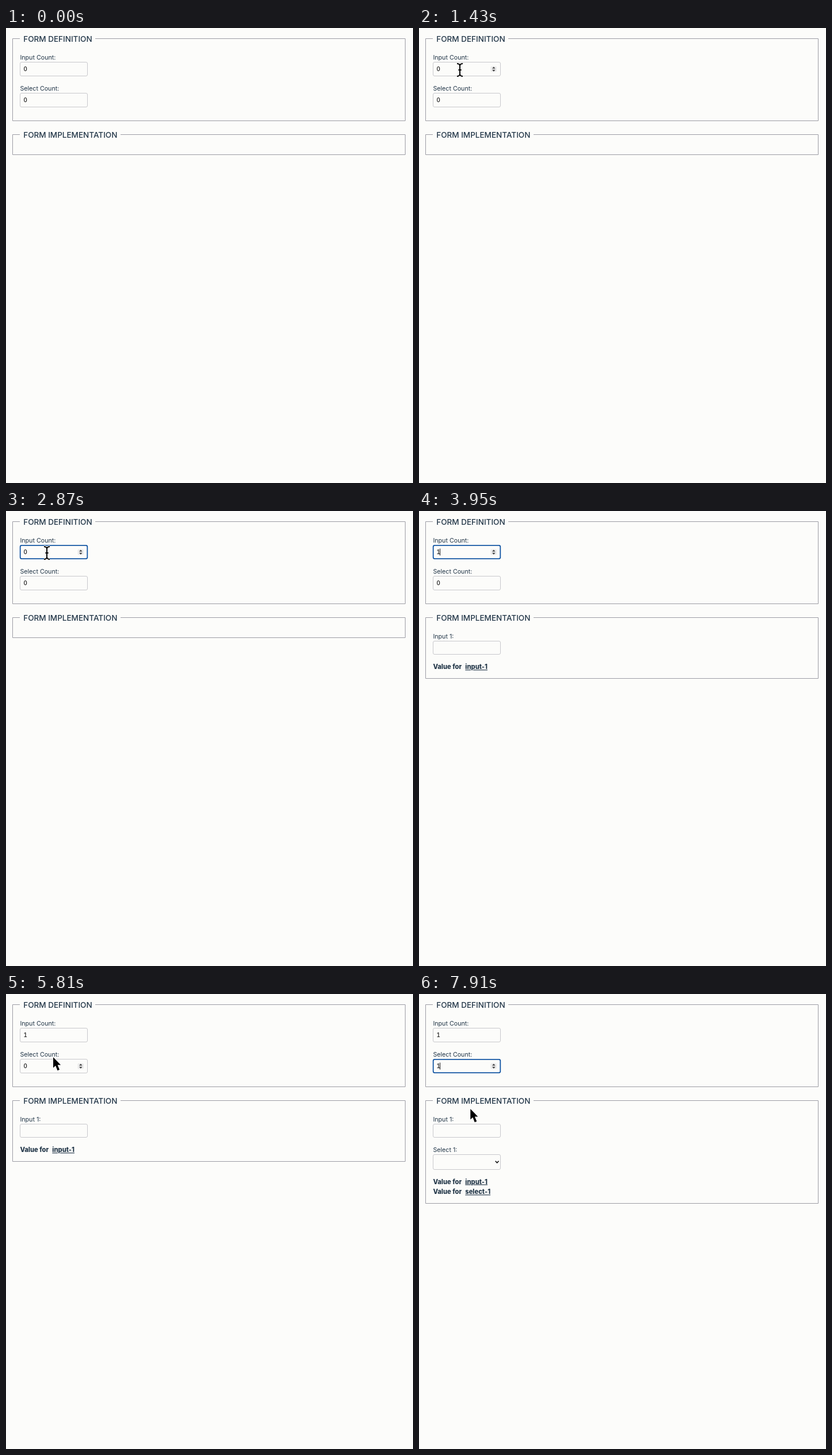
An HTML page for the animation above (8 s loop, 707 by 792 pixels).

```html
<!DOCTYPE html>
<html lang="en">
<head>
<meta charset="utf-8">
<title>Dynamic form</title>
<style>
  html, body { margin: 0; width: 100%; height: 100%; overflow: hidden; background: #fcfcfa; }
  svg { display: block; width: 100%; height: 100%; }
  text { font-family: Inter, sans-serif; fill: #213547; white-space: pre; }
  .legend { font-size: 13.5px; font-weight: 450; }
  .label { font-size: 10.7px; }
  .value { font-size: 9.8px; font-weight: 500; font-variant-numeric: tabular-nums; fill: #111; }
  .bold { font-size: 11.15px; font-weight: 800; }
  .under { text-decoration: underline; }
  .frame { fill: none; stroke: #9c9ca4; }
  .box { fill: none; stroke: #c8c8cc; }
  .ring { fill: none; stroke: #1457a4; stroke-width: 1.8; }
</style>
</head>
<body>
<svg id="stage" viewBox="0 0 707 792" preserveAspectRatio="none"></svg>
<script>
const LOOP = 8000;
const FIRST_FOCUS = 1570, FIRST_TYPE = 3680, BLUR = 5800;
const SECOND_FOCUS = 5910, SECOND_TYPE = 6880;

// Each run of [ms, x, y] is one stretch in which the pointer is visible.
const runs = [
  [[20, 190, 445], [420, 135, 250], [770, 92, 100], [960, 84, 84], [1140, 74, 62],
   [1340, 71, 73], [FIRST_TYPE, 71, 73]],
  [[4350, 71, 73], [4560, 71, 73], [4790, 74, 85], [4900, 74, 85], [5450, 82, 110],
   [SECOND_TYPE, 82, 110]],
  [[7590, 82, 110], [7850, 89.3, 200], [LOOP, 89.3, 200]]
];

const stage = document.getElementById("stage");

function add(parent, tag, attrs, content) {
  const el = document.createElementNS("http://www.w3.org/2000/svg", tag);
  for (const name in attrs) el.setAttribute(name, attrs[name]);
  if (content) el.textContent = content;
  return parent.appendChild(el);
}
const group = parent => add(parent, "g", {});
const text = (parent, cls, x, y, content) => add(parent, "text", { class: cls, x, y }, content);
const show = (el, on) => el.setAttribute("visibility", on ? "visible" : "hidden");

function fieldset(y, gapEnd, title) {
  const frame = add(stage, "path", { class: "frame" });
  text(stage, "legend", 30.2, y + 5.2, title);
  return bottom => frame.setAttribute("d",
    `M24 ${y}H11.5V${bottom}H693.5V${y}H${gapEnd}`);
}

function control(parent, label, y, height = 24) {
  text(parent, "label", 24.4, y - 4.5, label);
  add(parent, "rect", { class: "box", x: 24.5, y, width: 117, height, rx: 2.5 });
}

function numberField(label, y) {
  control(stage, label, y);
  const value = text(stage, "value", 30.6, y + 15.7, "0");
  const spinner = group(stage);
  add(spinner, "rect", { x: 124.5, y: y + 7, width: 10.5, height: 10, rx: 2, fill: "#ececec" });
  add(spinner, "path", {
    fill: "#3c3c3c",
    d: `M127 ${y + 11}l2.8-3 2.8 3zM127 ${y + 13.2}l2.8 3 2.8-3z`
  });
  const ring = add(stage, "rect", {
    class: "ring", x: 24.7, y: y + .4, width: 116.6, height: 23.2, rx: 2.5
  });
  const caret = add(stage, "rect", { x: 36, y: y + 6, width: 1, height: 12, fill: "#111" });
  return ({ count, focused, caretOn, hovered }) => {
    value.textContent = count;
    show(ring, focused);
    show(caret, focused && caretOn);
    show(spinner, focused || hovered);
  };
}

function result(parent) {
  const line = group(parent);
  text(line, "bold", 24.4, 0, "Value for");
  const name = text(line, "bold under", 80.3, 0, "");
  return (id, y) => {
    name.textContent = id;
    line.setAttribute("transform", `translate(0 ${y})`);
  };
}

const setDefinition = fieldset(18.5, 155, "FORM DEFINITION");
setDefinition(161.5);
const setInputCount = numberField("Input Count:", 59.5);
const setSelectCount = numberField("Select Count:", 113.5);
const setImplementation = fieldset(185.5, 199, "FORM IMPLEMENTATION");

const inputPart = group(stage);
control(inputPart, "Input 1:", 226.5, 23);
const setInputResult = result(inputPart);

const selectPart = group(stage);
control(selectPart, "Select 1:", 279.5, 26);
add(selectPart, "path", {
  d: "M132.7 290.8l2.9 3 2.9-3", fill: "none", stroke: "#111", "stroke-width": 1.6
});
const setSelectResult = result(selectPart);
setSelectResult("select-1", 348.2);

const arrow = add(stage, "path", {
  d: "M0 0V18.6L4.1 14.8 7.5 23.2 11 21.7 7.6 13.5H13.1Z",
  fill: "#000", stroke: "#fff", "stroke-width": 1.6, "paint-order": "stroke"
});
const beam = group(stage);
const beamShape = "M-5-11Q-1-11 0-8Q1-11 5-11M0-8V8M-5 11Q-1 11 0 8Q1 11 5 11M-2.6 0H2.6";
for (const [stroke, width] of [["#fff", 4], ["#000", 2]])
  add(beam, "path", { d: beamShape, fill: "none", stroke, "stroke-width": width });

function pointerAt(t) {
  const run = runs.find(r => t >= r[0][0] && t < r[r.length - 1][0]);
  if (!run) return null;
  const i = run.findIndex(key => key[0] > t);
  const [t0, x0, y0] = run[i - 1], [t1, x1, y1] = run[i];
  const p = (t - t0) / (t1 - t0), e = p * p * (3 - 2 * p);
  return { x: x0 + (x1 - x0) * e, y: y0 + (y1 - y0) * e };
}

const inside = (p, top, bottom) =>
  !!p && p.x > 24 && p.x < 142 && p.y >= top && p.y <= bottom;
const blink = (t, since) => (t - since + LOOP) % 1000 < 500;

function render(t) {
  const pointer = pointerAt(t);
  const inputs = +(t >= FIRST_TYPE), selects = +(t >= SECOND_TYPE);

  setInputCount({
    count: inputs,
    focused: t >= FIRST_FOCUS && t < BLUR,
    caretOn: blink(t, inputs ? FIRST_TYPE : 2140),
    hovered: inside(pointer, 45, 86)
  });
  setSelectCount({
    count: selects,
    focused: t >= SECOND_FOCUS,
    caretOn: blink(t, selects ? SECOND_TYPE : SECOND_FOCUS),
    hovered: inside(pointer, 98, 138)
  });

  show(inputPart, inputs);
  show(selectPart, selects);
  setInputResult("input-1", selects ? 330.5 : 275.2);
  setImplementation(selects ? 364.5 : inputs ? 291.5 : 220.5);

  const typing = inside(pointer, 59, 86) || inside(pointer, 113, 138);
  show(arrow, pointer && !typing);
  show(beam, pointer && typing);
  if (pointer)
    (typing ? beam : arrow).setAttribute("transform", `translate(${pointer.x} ${pointer.y})`);
}

const start = performance.now();
function tick() {
  render((performance.now() - start) % LOOP);
  requestAnimationFrame(tick);
}
render(0);
requestAnimationFrame(tick);
</script>
</body>
</html>
```
